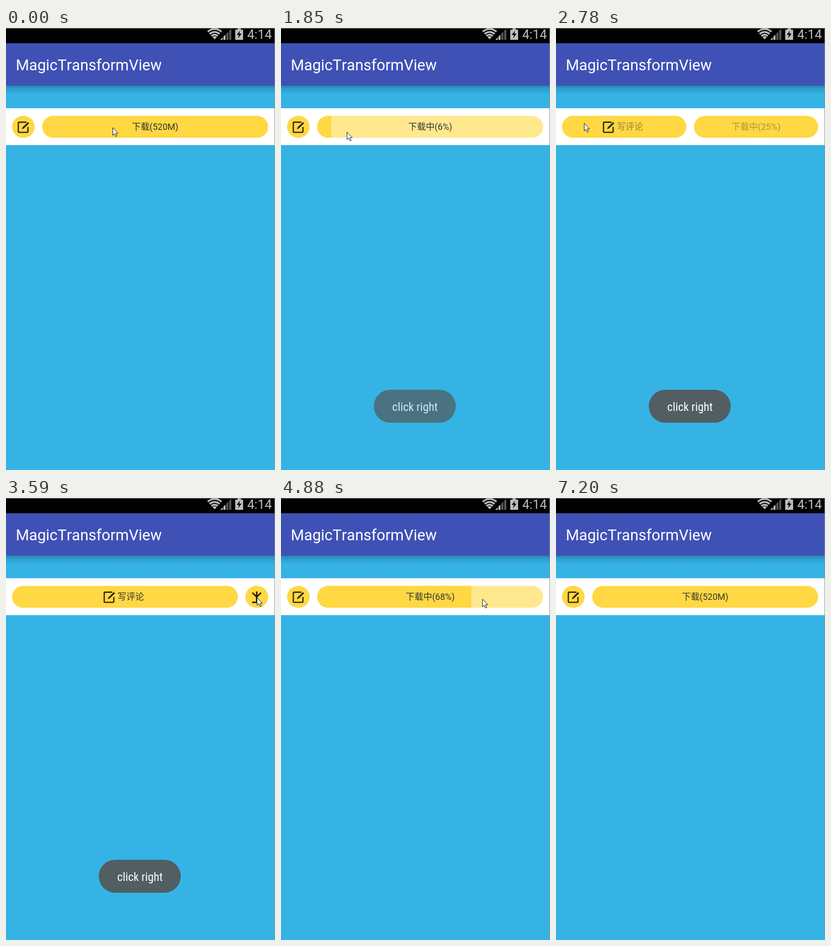
An HTML page that plays this animation: 548x898 px, repeating every 7.75 s.

```html
<!DOCTYPE html>
<html lang="zh-CN">
<head>
<meta charset="utf-8">
<title>MagicTransformView</title>
<style>
  html, body { margin: 0; width: 100%; height: 100%; overflow: hidden; background: #35b3e5; }
  svg { display: block; width: 548px; height: 898px; }
  text { font-family: Roboto, "Noto Sans CJK SC", "Noto Sans CJK", sans-serif; font-kerning: none; }
  .label { font-size: 18px; fill: #333; }
  .middle { text-anchor: middle; }
  .toast { font-family: "Roboto Condensed", Roboto, sans-serif; font-stretch: 75%; font-size: 24px; fill: #fff; }
</style>
</head>
<body>
<svg viewBox="0 0 548 898">
  <defs>
    <linearGradient id="shade" x2="0" y2="1">
      <stop stop-color="#124a70" stop-opacity=".45"/>
      <stop offset=".35" stop-color="#124a70" stop-opacity=".2"/>
      <stop offset="1" stop-color="#124a70" stop-opacity="0"/>
    </linearGradient>
    <clipPath id="rightClip"><rect id="rightShape" y="178.5" height="44.5" rx="22.25"/></clipPath>
  </defs>

  <rect width="548" height="898" fill="#35b3e5"/>
  <rect y="117" width="548" height="18" fill="url(#shade)"/>
  <rect y="31" width="548" height="86" fill="#3f51b5"/>
  <rect width="548" height="31"/>
  <text x="20" y="86" font-size="31" fill="#fff">MagicTransformView</text>

  <g fill="#bdbdbd">
    <g fill="none" stroke="#bdbdbd" stroke-width="3.6">
      <path d="M411 7.5Q425 -3.5 439 7.5"/>
      <path d="M414.8 12Q425 4 435.2 12"/>
      <path d="M418.4 16.2Q425 11 431.6 16.2"/>
    </g>
    <path d="M420.6 18.2Q425 15.4 429.4 18.2L425 23Z"/>
    <path d="M437 24V23.5L441.5 19V24ZM443 24V17.5L447 13.5V24Z"/>
    <path d="M448.5 24V12L453 7.5V24ZM454.5 24V6L459 1.5V24Z" fill="#555"/>
    <path d="M467 3.5H471.5V1H478.5V3.5H483V24H467Z"/>
    <path d="M476.5 5.5L470 14H474.5L472.5 21L480 11.5H475.5Z" fill="#000"/>
    <text x="491.5" y="22" font-size="26">4:14</text>
  </g>

  <rect y="163" width="548" height="75" fill="#fff"/>
  <path d="M0 .5H547.5V898" fill="none" stroke="#8c8c8c"/>

  <rect id="left" x="12.3" y="178.5" height="44.5" rx="22.25" fill="#ffd843"/>
  <g id="comment">
    <path d="M18 1.4H3.4Q1.4 1.4 1.4 3.4V20Q1.4 22 3.4 22H19Q21 22 21 20V11" fill="none" stroke="#33290f" stroke-width="2.6"/>
    <path d="M8.5 15.5L10 11.8L20.8 1.2L23.6 3.6L12.5 14.3Z" fill="#33290f"/>
    <text id="commentText" class="label" x="28.5" y="17">写评论</text>
  </g>

  <g clip-path="url(#rightClip)">
    <rect id="track" x="73" y="178" width="462" height="46"/>
    <rect id="fill" x="73.7" y="178" height="46" fill="#ffd843"/>
  </g>
  <text id="status" class="label middle" y="207"></text>
  <path id="arrow" d="M510.8 190V212M502 192.5L510.8 201L519.5 192.5M501.5 212H520" fill="none" stroke="#241c08" stroke-width="3"/>

  <g id="toast">
    <rect x="189" y="735" width="167" height="67" rx="33.5" fill="#525e62"/>
    <text class="toast middle" x="273" y="778">click right</text>
  </g>
  <path id="cursor" d="M.5 .5V16L4 12.6L6.6 18.5L9 17.5L6.5 11.8H11.3Z" fill="#fff" stroke="#111"/>
</svg>
<script>
const LOOP = 7750;
const CLICK = 1580;      // download starts
const STEP = 133.8;      // the picture is refreshed at this pace
const LEAD = 37;

// Pointer rests: time, x, y
const rests = [
  [1300, 217, 202], [1440, 218, 214], [2300, 36, 208], [2784, 57, 193], [3320, 508, 199],
  [3587, 511, 202], [4350, 511, 202], [5600, 158, 213], [5862, 154, 209], [7000, 494, 872]
];

const el = Object.fromEntries([...document.querySelectorAll('svg [id]')].map(n => [n.id, n]));
const clamp = v => Math.max(0, Math.min(1, v));
const ramp = (t, from, to) => clamp((t - from) / (to - from));
const smooth = k => k * k * (3 - 2 * k);
const set = (node, attrs) => {
  for (const key in attrs) node.setAttribute(key, attrs[key]);
};

function pointerAt(t) {
  let [, x, y] = rests[0];
  for (let i = 1; i < rests.length; i++) {
    const [from, x0, y0] = rests[i - 1];
    const [to, x1, y1] = rests[i];
    const k = smooth(ramp(t, from, to));
    x += (x1 - x0) * k;
    y += (y1 - y0) * k;
  }
  return [Math.round(x), Math.round(y)];
}

function refreshTime(now) {
  const step = Math.floor((now + LEAD - CLICK) / STEP);
  return step < 0 ? now : CLICK + step * STEP;
}

function draw(t) {
  const open = ramp(t, 2664, 2904) - ramp(t, 4222, 4528);
  const shift = 414 * open;
  const leftWidth = 46 + shift;
  const rightX = 73.7 + shift;
  const rightWidth = 460.3 - shift;

  set(el.left, { width: leftWidth });
  const iconX = Math.max(23.7, 12.3 + leftWidth / 2 - 43.6);
  set(el.comment, { transform: `translate(${iconX} 190)` });
  set(el.commentText, { opacity: open });

  const percent = (t - 1549) * 0.02104;
  const loading = t >= CLICK && percent < 100;
  const showProgress = loading && (t < 2510 || t >= 4600);
  set(el.rightShape, { x: rightX, width: rightWidth });
  set(el.track, { fill: showProgress ? '#ffe88e' : '#ffd843' });
  set(el.fill, { width: showProgress ? 4.603 * percent : 0 });
  el.status.textContent = loading ? `下载中(${Math.floor(percent)}%)` : '下载(520M)';
  set(el.status, { x: rightX + rightWidth / 2, opacity: clamp(1 - 1.2 * open) });
  set(el.arrow, { opacity: t >= 3000 && t < 4222 ? 1 : 0 });

  const toast = ramp(t, 1545, 1945) * (1 - ramp(t, 3560, 4060) ** 2);
  set(el.toast, { opacity: toast });

  const [x, y] = pointerAt(t);
  set(el.cursor, { transform: `translate(${x} ${y})`, visibility: t < 7180 ? 'visible' : 'hidden' });
}

const start = performance.now();
function tick() {
  draw(refreshTime((performance.now() - start) % LOOP));
  requestAnimationFrame(tick);
}
tick();
</script>
</body>
</html>
```
